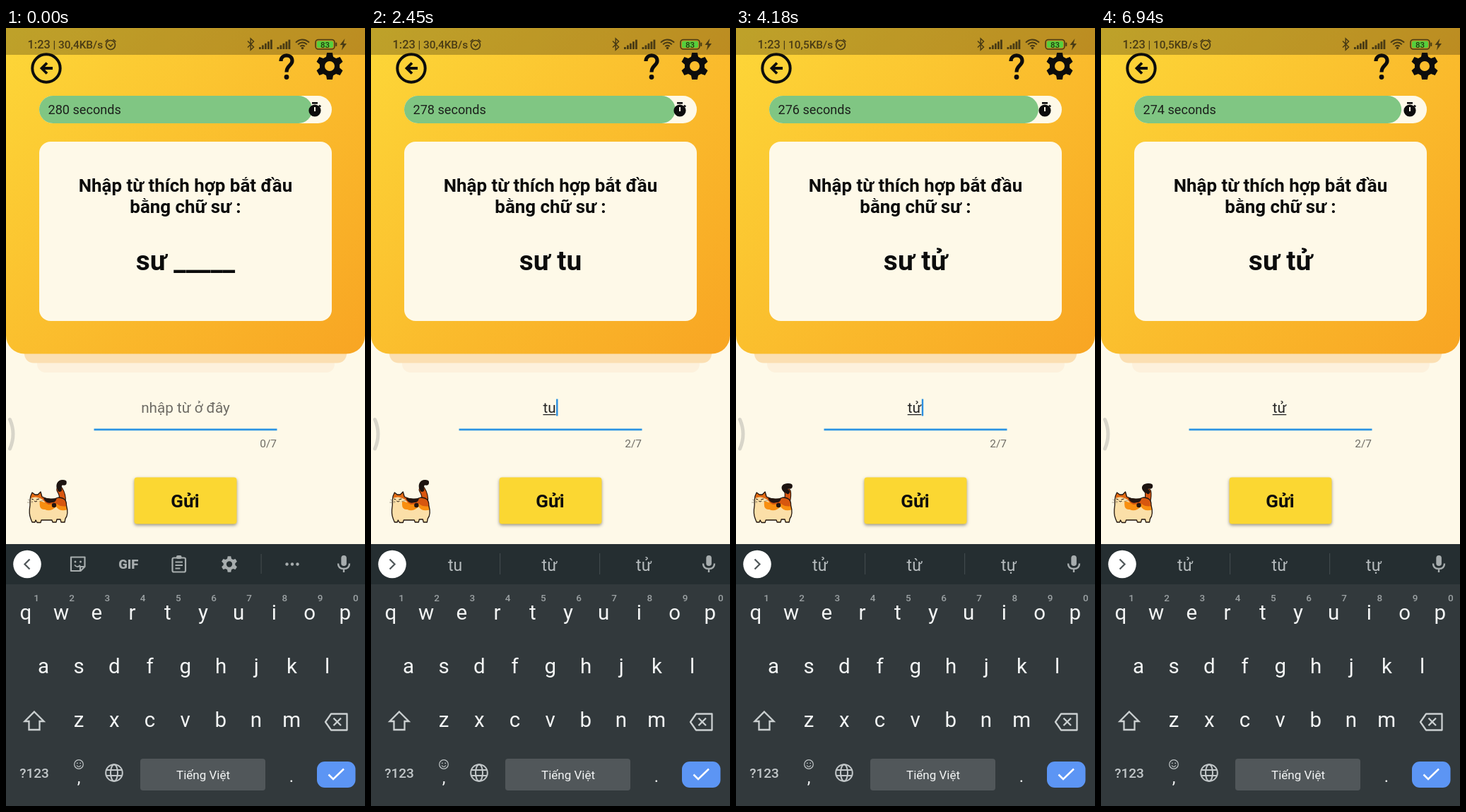
An HTML page with a canvas that plays this animation: 508 px wide and 1102 px high, repeating every 6.97 s.

```html
<!DOCTYPE html>
<html lang="vi">
<head>
<meta charset="utf-8">
<title>Word game</title>
<style>
html, body { margin: 0; width: 100%; height: 100%; overflow: hidden; background: #fef9e8; }
canvas { display: block; width: 508px; height: 1102px; }
</style>
</head>
<body>
<canvas id="stage"></canvas>
<script>
const W = 508, H = 1102, LOOP = 6970;
const FONT = 'Roboto, "Noto Sans", sans-serif';
const CREAM = '#fef9e8', INK = '#0c0c0c', ICON = '#a7adae', KEY = '#f3f5f5';
const canvas = document.getElementById('stage');
const ratio = window.devicePixelRatio || 1;
canvas.width = W * ratio;
canvas.height = H * ratio;
const ctx = canvas.getContext('2d');

// Each press shows a key bubble; the text changes on release.
const presses = [
  { key: 't', x: 228.5, from: 1650, to: 1760, text: 't', hints: ['t', 'tôi', 'thì'] },
  { key: 'u', x: 329, from: 2130, to: 2240, text: 'tu', hints: ['tu', 'từ', 'tử'] },
  { key: 'w', x: 78, from: 2680, to: 2790, text: 'tư', hints: ['tư', 'từ', 'tử'] },
  { key: 'r', x: 178, from: 3010, to: 3150, text: 'tử', hints: ['tử', 'từ', 'tự'] }
];

function label(str, x, y, size, color, align = 'center', weight = 400) {
  ctx.font = `${weight} ${size}px ${FONT}`;
  ctx.textAlign = align;
  ctx.fillStyle = color;
  ctx.fillText(str, x, y);
}

function box(x, y, w, h, r, color) {
  ctx.beginPath();
  ctx.roundRect(x, y, w, h, r);
  ctx.fillStyle = color;
  ctx.fill();
}

function frameBox(x, y, w, h, r, color, lw) {
  ctx.beginPath();
  ctx.roundRect(x, y, w, h, r);
  ctx.strokeStyle = color;
  ctx.lineWidth = lw;
  ctx.stroke();
}

function disc(x, y, r, color) {
  ctx.beginPath();
  ctx.arc(x, y, r, 0, 7);
  ctx.fillStyle = color;
  ctx.fill();
}

function ring(x, y, r, color, lw) {
  ctx.beginPath();
  ctx.arc(x, y, r, 0, 7);
  ctx.strokeStyle = color;
  ctx.lineWidth = lw;
  ctx.stroke();
}

function stroke(d, color, lw, cap = 'butt') {
  ctx.strokeStyle = color;
  ctx.lineWidth = lw;
  ctx.lineCap = cap;
  ctx.lineJoin = cap === 'round' ? 'round' : 'miter';
  ctx.stroke(new Path2D(d));
}

function fill(d, color) {
  ctx.fillStyle = color;
  ctx.fill(new Path2D(d));
}

function gear(x, y, r, color) {
  ctx.beginPath();
  for (let i = 0; i < 6; i++) {
    const a = i * Math.PI / 3 - Math.PI / 2;
    for (const [da, k] of [[-0.36, 0.73], [-0.2, 1], [0.2, 1], [0.36, 0.73]])
      ctx.lineTo(x + Math.cos(a + da) * r * k, y + Math.sin(a + da) * r * k);
  }
  ctx.closePath();
  ctx.moveTo(x + r * 0.36, y);
  ctx.arc(x, y, r * 0.36, 0, 7);
  ctx.fillStyle = ctx.strokeStyle = color;
  ctx.fill('evenodd');
}

function statusBar(t) {
  const c = '#493b14';
  ctx.fillStyle = 'rgba(0,0,0,.25)';
  ctx.fillRect(0, 0, W, 38);
  label('1:23', 30.5, 29, 16.4, c, 'left', 500);
  label('|', 68.5, 28.5, 15, c, 'center', 500);
  label((t < 2970 ? '30,4' : '10,5') + 'KB/s', 74, 29, 15.4, c, 'left', 500);
  ring(148, 24, 6.5, c, 1.7);
  stroke('M145 23l3 3l3.5-3.5M140.5 19.5l4-3.5M155.5 19.5l-4-3.5', c, 1.6);
  stroke('M342 18.5l8.5 8.5l-4.3 4V15l4.3 4l-8.5 8.5', c, 1.5);
  ctx.fillStyle = c;
  for (const x of [358, 383.5])
    for (let i = 0; i < 5; i++) ctx.fillRect(x + i * 4, 27 - i * 2.6, 2.8, 3 + i * 2.6);
  for (let i = 1; i < 4; i++) {
    ctx.beginPath();
    ctx.arc(419.5, 29, i * 4.2, -Math.PI * 0.77, -Math.PI * 0.23);
    ctx.strokeStyle = c;
    ctx.lineWidth = 2;
    ctx.stroke();
  }
  disc(419.5, 28.5, 1.8, c);
  frameBox(438, 16.5, 27, 13.5, 4, c, 1.6);
  box(440, 18.5, 23, 9.5, 2, '#56cf3c');
  label('83', 451.5, 27.5, 11.5, '#25360f', 'center', 500);
  box(466.3, 20.5, 2, 5.5, 1, c);
  fill('M479.5 15l-7 9h4l-1.5 7.5l7-9.5h-4.3z', c);
}

function header(t, typed) {
  box(44, 440, 421, 48, 12, '#fdf1dc');
  box(26, 440, 456, 34.5, 13, '#fbdfb2');
  const g = ctx.createLinearGradient(12, -11, 496, 472);
  g.addColorStop(0, '#fdd738');
  g.addColorStop(1, '#f8a523');
  box(0, -30, W, 491.5, 26, g);
  statusBar(t);

  ring(57, 57, 19.7, INK, 4);
  stroke('M66 57H51M58 49.5L50.5 57L58 64.5', INK, 3.8);
  stroke('M389 47C389 36 405 36.5 405 46.5C405 53 397 53 397 62.5', INK, 5.2);
  disc(397, 69.5, 3.4, INK);
  gear(458, 54, 19.5, INK);

  // The countdown starts at 280 of 300 seconds.
  const left = 280 - Math.max(0, Math.floor((t - 120) / 1000));
  box(47, 96, 414, 39, 19.5, CREAM);
  box(47, 96, 414 * left / 300, 39, 19.5, '#80c683');
  label(left + ' seconds', 59.5, 122, 18.1, '#1c211c', 'left');
  disc(437, 117, 8.6, INK);
  box(433, 105, 8, 2.6, 0, INK);
  stroke('M443 109.5l2.2 2.2', INK, 2.4);
  stroke('M437 112v6', CREAM, 2);

  box(47, 161, 414, 254, 16, CREAM);
  label('Nhập từ thích hợp bắt đầu', 254, 232, 25.9, INK, 'center', 700);
  label('bằng chữ sư :', 254, 262.3, 25.9, INK, 'center', 700);
  label('sư ' + (typed || '_____'), 254, 342.5, 38.9, INK, 'center', 700);
}

function answer(t, typed) {
  if (typed) {
    label(typed, 252.5, 545, 20.7, '#242424');
    const w = ctx.measureText(typed).width;
    ctx.fillRect(252.5 - w / 2, 547, w, 1.3);
    const last = presses.filter(p => t >= p.to).pop().to;
    if (Math.floor((t - last) / 500) % 2 === 0) {
      ctx.fillStyle = '#2b8fe0';
      ctx.fillRect(252.5 + w / 2 + 0.5, 525.5, 2.4, 24);
    }
  } else label('nhập từ ở đây', 254, 545, 20.7, '#6e6c65');
  ctx.fillStyle = '#2b94e3';
  ctx.fillRect(124.5, 567.5, 259, 2.7);
  label(typed.length + '/7', 383, 594, 15.5, '#6e6c65', 'right');
  stroke('M5.5 554.5Q14.5 575 5.5 596', '#d8d5c9', 5, 'round');

  ctx.save();
  ctx.shadowColor = 'rgba(0,0,0,.4)';
  ctx.shadowBlur = 4 * ratio;
  ctx.shadowOffsetY = 2 * ratio;
  box(181.5, 636.5, 145, 66, 4, '#fbd732');
  ctx.restore();
  label('Gửi', 253.5, 679, 25.9, INK, 'center', 700);
}

function cat(t) {
  const k = Math.min(1, Math.max(0, (t - 2700) / 1200));
  const p = k * k * (3 - 2 * k);
  const mix = (a, b) => a + (b - a) * p;
  ctx.save();
  ctx.translate(32 - 2.4 * Math.max(0, t - 910) / 1000, 640);

  // Tail swings from upright to curled.
  const mx = mix(44, 49), my = mix(14, 17);
  const base = `M48 31Q${mix(49, 50)} 22 ${mx} ${my}`;
  const tip = `M${mx} ${my}C${mix(42, 43)} ${mix(8, 13)} ${mix(43, 41)} ${mix(3, 8)} ${mix(50, 52)} ${mix(4, 9)}`;
  stroke(base, '#20120a', 9.5, 'round');
  stroke(tip, '#1d1410', 7.5, 'round');
  stroke(base, '#d9560f', 7.3, 'round');
  stroke(tip, '#1d1410', 6, 'round');

  const body = 'M2 29Q2 23 5 18L9 21H13L17 17L19 24Q31 30 42 25Q54 25 53.5 36Q57 49 52 55L51 60H46L45 56'
    + 'H40L39 60H34L33 57H18L17 60.5H12L10 57L9 60H5L3 55Q0 48 2 36Z';
  const shape = new Path2D(body);
  fill(body, '#fbdfa8');
  ctx.save();
  ctx.clip(shape);
  fill('M3 17H20V28Q10 22 3 26z', '#e26a13');
  fill('M16 30Q24 33 30 32H56V42Q44 46 39 38Q31 46 23 42Q14 43 16 30z', '#f88e10');
  fill('M17 21H56V37Q45 39 40 34L28 35Q20 31 17 21z', '#d7570f');
  fill('M21 26Q32 26 40 24Q39 33 33 32Q25 35 21 26z', '#251611');
  disc(36, 36, 3.2, '#251611');
  ctx.restore();
  stroke(body, '#20150e', 1.3, 'round');
  stroke('M4 27l3 1M11 28l4-1M8 30l2 1l2-1', '#20150e', 1);
  stroke('M6 31L-1 28M6 32L-2 32M15 31L21 29', '#75695a', 0.6);
  ctx.restore();
}

function mic() {
  box(474.3, 747, 7.6, 15, 3.8, ICON);
  stroke('M470 758.5Q470 766 478 766Q486 766 486 758.5M478 766V771', ICON, 2.4);
}

function toolbar(hints) {
  ctx.fillStyle = '#252e31';
  ctx.fillRect(0, 731, W, 57);
  disc(30, 759.5, 19.8, '#fff');
  mic();
  if (hints) {
    stroke('M26.5 752.5l7 7l-7 7', '#51585b', 2.3);
    hints.forEach((h, i) => label(h, [119, 252.5, 386][i], 768.5, 23, '#b5bbbd'));
    ctx.fillStyle = '#40484b';
    for (const x of [182, 323]) ctx.fillRect(x, 744, 1.2, 30);
    return;
  }
  stroke('M33.5 752.5l-7 7l7 7', '#51585b', 2.3);
  stroke('M92 749.5H111.5V763L105.5 769H92ZM105 769V763H111.5', ICON, 2.2, 'round');
  disc(98, 756, 1.5, ICON);
  disc(105.5, 756, 1.5, ICON);
  stroke('M97 760.5Q101 765.5 105 761', ICON, 1.9);
  label('GIF', 173.3, 766, 18.5, ICON, 'center', 900);
  frameBox(235.5, 750.5, 18.5, 20, 2, ICON, 2.2);
  box(241, 747, 7.5, 5, 2, ICON);
  stroke('M239.5 756.5h10.5M239.5 761h10.5M239.5 765.5h7', ICON, 2);
  gear(316, 759.5, 11.5, ICON);
  ctx.fillStyle = '#40484b';
  ctx.fillRect(360.5, 745, 1.2, 28);
  for (const x of [397.5, 405, 412.5]) disc(x, 759.5, 2.2, ICON);
}

function keyboard() {
  ctx.fillStyle = '#32393c';
  ctx.fillRect(0, 788, W, H - 788);
  const rows = [['qwertyuiop', 28, 838], ['asdfghjkl', 53, 914], ['zxcvbnm', 103, 990]];
  for (const [keys, x, y] of rows)
    [...keys].forEach((k, i) => label(k, x + i * 50.2, y, 29.5, KEY));
  for (let i = 0; i < 10; i++) label((i + 1) % 10, 43 + i * 50.2, 812, 13.5, '#9ca2a4', 'center', 500);

  stroke('M40 968.5L53.5 982H47.5V994H32.5V982H26.5Z', '#cbd0d1', 2.3);
  stroke('M460 971.5H482.5V994.5H460L452 983Z', '#cbd0d1', 2.3, 'round');
  stroke('M463.5 977.5l10.5 10.5M474 977.5l-10.5 10.5', '#cbd0d1', 2.3);

  label('?123', 40, 1062, 19, '#c3c8ca', 'center', 500);
  ring(103, 1043, 6.3, '#c3c8ca', 1.2);
  disc(100.8, 1041.3, 0.9, '#c3c8ca');
  disc(105.2, 1041.3, 0.9, '#c3c8ca');
  stroke('M100 1044.5Q103 1048.5 106 1044.5', '#c3c8ca', 1.2);
  label(',', 103, 1070, 24, KEY);
  label('.', 404, 1068, 24, KEY);
  ring(153, 1055, 11.8, '#c3c8ca', 2);
  ctx.beginPath();
  ctx.ellipse(153, 1055, 5, 11.8, 0, 0, 7);
  ctx.stroke();
  stroke('M142 1051h22M142 1059h22', '#c3c8ca', 2);
  box(190, 1035, 177, 45, 4, '#51575a');
  label('Tiếng Việt', 279, 1064, 17, KEY);
  box(440, 1039, 54.5, 37, 11, '#5c95f4');
  stroke('M456.5 1057.5l6.5 6.5l15-14.5', '#fff', 2.5);
}

function bubble(p) {
  ctx.save();
  ctx.shadowColor = 'rgba(0,0,0,.35)';
  ctx.shadowBlur = 5 * ratio;
  ctx.shadowOffsetY = ratio;
  box(p.x - 25, 706.5, 49.5, 155.5, 5, '#242c2f');
  ctx.restore();
  label(p.key, p.x - 1, 755.5, 32, KEY);
  for (let i = 0; i < 3; i++) disc(p.x + 8 + i * 4.4, 771, 1.1, KEY);
}

function draw(t) {
  ctx.setTransform(ratio, 0, 0, ratio, 0, 0);
  ctx.fillStyle = CREAM;
  ctx.fillRect(0, 0, W, H);
  const done = presses.filter(p => t >= p.to).pop();
  const typed = done ? done.text : '';
  header(t, typed);
  answer(t, typed);
  cat(t);
  toolbar(done && done.hints);
  keyboard();
  const held = presses.find(p => t >= p.from && t < p.to);
  if (held) bubble(held);
}

const start = performance.now();
function tick() {
  draw((performance.now() - start) % LOOP);
  requestAnimationFrame(tick);
}
tick();
</script>
</body>
</html>
```
